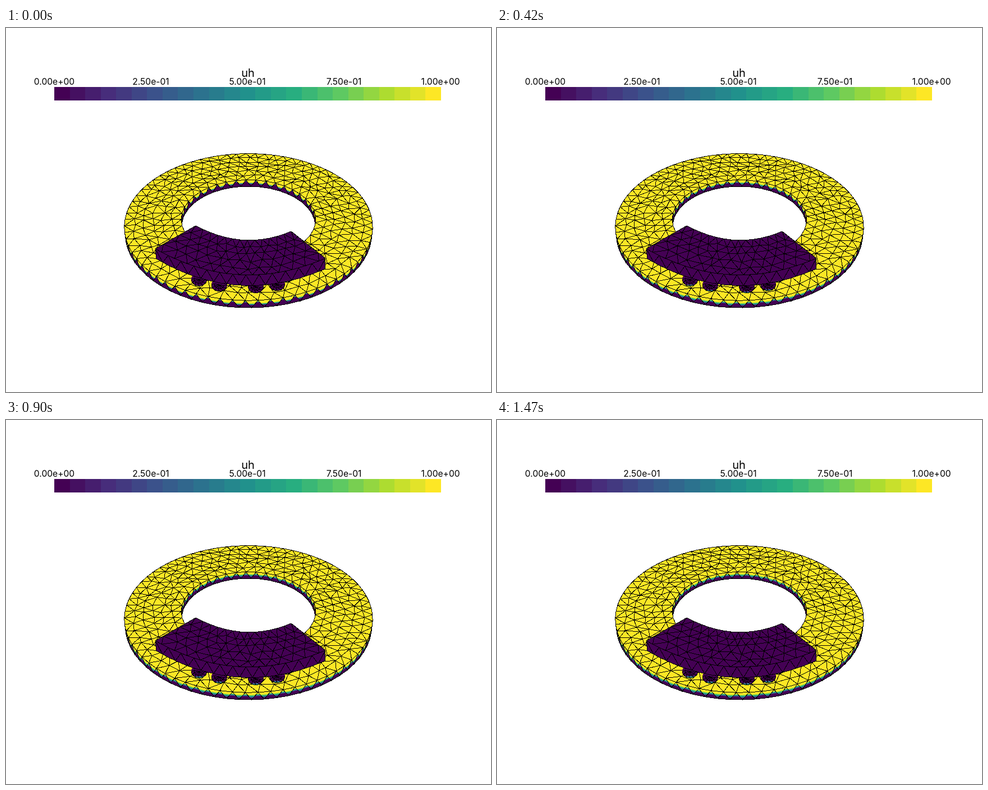
Recreate the animation shown at these times as an HTML page. Size 864x648 px, loop 1500 ms.

```html
<!DOCTYPE html>
<html lang="en">
<head>
<meta charset="utf-8">
<title>Disc heat field</title>
<style>
  html, body { margin: 0; width: 100%; height: 100%; overflow: hidden; background: #fff; }
  svg { display: block; width: 100vw; height: 100vh; }
  text { font-family: Inter, Arial, sans-serif; font-size: 15.6px; text-anchor: middle; fill: #000; }
</style>
</head>
<body>
<svg id="stage" viewBox="0 0 864 648"><defs id="defs"></defs></svg>
<script>
const LOOP = 1500, STEP = 30, LAST = 49;
const VIRIDIS = ['#440154', '#472d7b', '#3b528b', '#2c728e', '#21918c', '#28ae80', '#5ec962', '#addc30', '#fde725'];
const DARK = VIRIDIS[0], YELLOW = VIRIDIS[8];
const OUTER = 1, INNER = 0.546, TOP = -0.062, BASE = -0.13, CELL = 0.088;
const stage = document.getElementById('stage');
const defs = document.getElementById('defs');

let seed = 11;
const rand = () => (seed = (seed * 16807) % 2147483647) / 2147483647;
const jitter = a => (rand() - 0.5) * 2 * a;
const mix = (a, b, k) => a + (b - a) * k;

function add(parent, tag, attrs) {
  const el = document.createElementNS('http://www.w3.org/2000/svg', tag);
  for (const k in attrs) el.setAttribute(k, attrs[k]);
  parent.appendChild(el);
  return el;
}

const line = pts => 'M' + pts.map(p => p[0].toFixed(2) + ' ' + p[1].toFixed(2)).join('L');
const shape = pts => line(pts) + 'Z';
const fill = (d, color) => add(stage, 'path', { d, fill: color, 'fill-rule': 'evenodd' });
const wire = d => add(stage, 'path', {
  d, fill: 'none', stroke: '#000', 'stroke-width': 1, 'shape-rendering': 'crispEdges'
});

// Camera at isometric elevation
function project(x, y, z) {
  const depth = 5.49 + y * 0.8165 - z * 0.5774;
  return [432 + 1209 * x / depth, 324 - 1209 * (y * 0.5774 + z * 0.8165) / depth];
}
const onDisc = (r, a, z) => project(r * Math.cos(a), r * Math.sin(a), z);

function viridis(v) {
  const i = Math.min(7, Math.floor(v * 8)), k = v * 8 - i;
  const part = (hex, n) => parseInt(hex.slice(1 + n * 2, 3 + n * 2), 16);
  const rgb = [0, 1, 2].map(n => Math.round(mix(part(VIRIDIS[i], n), part(VIRIDIS[i + 1], n), k)));
  return `rgb(${rgb})`;
}

// Bowyer-Watson triangulation
function delaunay(input) {
  const n = input.length;
  const pts = input.concat([[-900, -800], [900, -800], [0, 1100]]);
  const make = (a, b, c) => {
    const [ax, ay] = pts[a], bx = pts[b][0] - ax, by = pts[b][1] - ay;
    const cx = pts[c][0] - ax, cy = pts[c][1] - ay;
    const d = 2 * (bx * cy - by * cx), b2 = bx * bx + by * by, c2 = cx * cx + cy * cy;
    const ux = (cy * b2 - by * c2) / d, uy = (bx * c2 - cx * b2) / d;
    return { v: [a, b, c], x: ax + ux, y: ay + uy, r2: ux * ux + uy * uy };
  };
  let tris = [make(n, n + 1, n + 2)];
  for (let i = 0; i < n; i++) {
    const rim = new Map(), keep = [];
    for (const t of tris) {
      if ((pts[i][0] - t.x) ** 2 + (pts[i][1] - t.y) ** 2 >= t.r2) { keep.push(t); continue; }
      t.v.forEach((a, k) => {
        const b = t.v[(k + 1) % 3], key = Math.min(a, b) + '_' + Math.max(a, b);
        if (rim.has(key)) rim.delete(key); else rim.set(key, [a, b]);
      });
    }
    for (const [a, b] of rim.values()) keep.push(make(a, b, i));
    tris = keep;
  }
  return tris.map(t => t.v).filter(v => v.every(i => i < n));
}

function edges(tris, pts) {
  const seen = new Set();
  let d = '';
  for (const v of tris) v.forEach((a, k) => {
    const b = v[(k + 1) % 3], key = Math.min(a, b) + '_' + Math.max(a, b);
    if (seen.has(key)) return;
    seen.add(key);
    d += line([pts[a], pts[b]]);
  });
  return d;
}

// Shared colour ramps; every shaded face refers to one of them
const ramps = {};
for (const id of ['down', 'up', 'rim']) {
  const g = add(defs, 'linearGradient', { id });
  ramps[id] = VIRIDIS.map((c, i) => add(g, 'stop', { 'stop-color': VIRIDIS[8 - i] }));
}
function setRamp(id, from, to) {
  ramps[id].forEach((s, i) => s.setAttribute('offset', mix(from, to, i / 8).toFixed(4)));
}

let faces = 0;
function shade(ramp, from, to) {
  const id = 'g' + faces++;
  add(defs, 'linearGradient', {
    id, href: '#' + ramp, gradientUnits: 'userSpaceOnUse',
    x1: from[0], y1: from[1], x2: to[0], y2: to[1]
  });
  return `url(#${id})`;
}
function foot(p, a, b) {
  const dx = b[0] - a[0], dy = b[1] - a[1];
  const k = ((p[0] - a[0]) * dx + (p[1] - a[1]) * dy) / (dx * dx + dy * dy);
  return [a[0] + dx * k, a[1] + dy * k];
}

const count = r => Math.round(2 * Math.PI * r / CELL);

function wall(r, visible) {
  const n = count(r), da = 2 * Math.PI / n;
  let mesh = '';
  for (let i = 0; i < n; i++) {
    if (!visible(Math.sin(i * da))) continue;
    const t0 = onDisc(r, i * da, TOP), t1 = onDisc(r, (i + 1) * da, TOP);
    const b0 = onDisc(r, (i + 0.5) * da, BASE), b1 = onDisc(r, (i + 1.5) * da, BASE);
    fill(shape([t0, t1, b0]), shade('down', foot(b0, t0, t1), b0));
    fill(shape([b0, b1, t1]), shade('up', t1, foot(t1, b0, b1)));
    mesh += line([t0, b0, t1]) + line([b0, b1]);
  }
  wire(mesh);
}

function disc() {
  wall(OUTER, s => s < 0.35);
  wall(INNER, s => s > -0.4);
  const pts = [], rows = 6, inner = count(INNER);
  for (let k = 0; k <= rows; k++) {
    const r = mix(INNER, OUTER, k / rows), n = count(r);
    const edge = k === 0 || k === rows, amount = edge ? 1e-5 : CELL * 0.2;
    const turn = edge ? 0 : rand();
    for (let i = 0; i < n; i++) {
      const a = 2 * Math.PI * (i + turn) / n;
      pts.push([r * Math.cos(a) + jitter(amount), r * Math.sin(a) + jitter(amount)]);
    }
  }
  const ring = r => Array.from({ length: count(r) }, (_, i) => onDisc(r, 2 * Math.PI * i / count(r), TOP));
  fill(shape(ring(OUTER)) + shape(ring(INNER)), YELLOW);
  const tris = delaunay(pts).filter(v => !v.every(i => i < inner));
  const rim = v => v.filter(i => i < inner || i >= pts.length - count(OUTER)).length > 1;
  const flat = pts.map(p => project(p[0], p[1], TOP));
  wire(edges(tris, flat));
}

function piston(x, y) {
  const rx = 14, ry = 12;
  const at = (a, k = 1) => [x + rx * k * Math.cos(a), y + ry * k * Math.sin(a)];
  add(stage, 'ellipse', { cx: x, cy: y, rx, ry, fill: shade('rim', [x, y + ry + 1], [x, y - ry]) });
  let mesh = '';
  const rim = [], mid = [];
  for (let i = 0; i <= 6; i++) {
    const a = Math.PI * i / 6;
    rim.push(at(a));
    mid.push(at(a + 0.25, 0.6));
    mesh += line([[x, y], at(a + 0.25, 0.6), at(a)]);
  }
  wire(mesh + line(rim) + line(mid));
}

const curve = (a, c, b) => t => [0, 1].map(i =>
  (1 - t) ** 2 * a[i] + 2 * t * (1 - t) * c[i] + t * t * b[i]);

function pad() {
  const back = curve([338, 352], [424, 398], [508, 362]);
  const front = curve([266, 393], [414, 477], [569, 410]);
  const low = curve([268, 411], [414, 496], [568, 429]);
  const cols = 13, rows = 5, span = Array.from({ length: cols + 1 }, (_, i) => i / cols);
  const outline = span.map(back).concat([front(1)], [...span].reverse().map(low), [front(0)]);
  fill(shape(outline), DARK);

  const uv = [];
  const put = (u, v) => uv.push([u + jitter(1e-5), v + jitter(1e-5)]);
  for (let j = 0; j <= rows; j++) {
    const shift = j % 2 ? 0.5 : 0;
    if (shift) { put(0, j); put(cols, j); }
    for (let u = shift; u <= cols; u++) {
      const inside = u > 0 && u < cols && j > 0 && j < rows;
      put(u + (inside ? jitter(0.22) : 0), j + (inside ? jitter(0.2) : 0));
    }
  }
  const pts = uv.map(([u, v]) => {
    const a = back(u / cols), b = front(u / cols);
    return [mix(a[0], b[0], v / rows), mix(a[1], b[1], v / rows)];
  });
  wire(edges(delaunay(uv), pts));

  let side = line(span.map(low)) + line([front(0), low(0)]) + line([front(1), low(1)]);
  for (let i = 0; i < cols; i++) {
    side += line([front(i / cols), low((i + 0.5) / cols), front((i + 1) / cols)]);
  }
  wire(side);
}

function colorBar() {
  const n = 25, left = 86, width = 689;
  for (let i = 0; i < n; i++) {
    add(stage, 'rect', {
      x: left + width * i / n, y: 105, width: width / n, height: 24,
      fill: viridis(i / (n - 1)), 'shape-rendering': 'crispEdges'
    });
  }
  ['0.00e+00', '2.50e-01', '5.00e-01', '7.50e-01', '1.00e+00'].forEach((s, i) => {
    add(stage, 'text', { x: left + 688 * i / 4, y: 101 }).textContent = s;
  });
  add(stage, 'text', { x: 431, y: 86.5, style: 'font-size:20px' }).textContent = 'uh';
}

// The warm front softens and creeps down the walls
function render(ms) {
  const s = Math.floor((ms % LOOP) / STEP) / LAST;
  const k = (1 - Math.exp(-3 * s)) / (1 - Math.exp(-3));
  setRamp('down', mix(0.4, 0.3, k), mix(0.68, 0.82, k));
  setRamp('up', mix(0.08, 0.2, k), mix(0.3, 0.6, k));
  setRamp('rim', 0, mix(0.1, 0.22, k));
}

colorBar();
disc();
[[344, 447.5], [380, 457], [445, 460], [483, 456]].forEach(p => piston(...p));
pad();

const start = performance.now();
function tick() {
  render(performance.now() - start);
  requestAnimationFrame(tick);
}
render(0);
requestAnimationFrame(tick);
</script>
</body>
</html>
```
